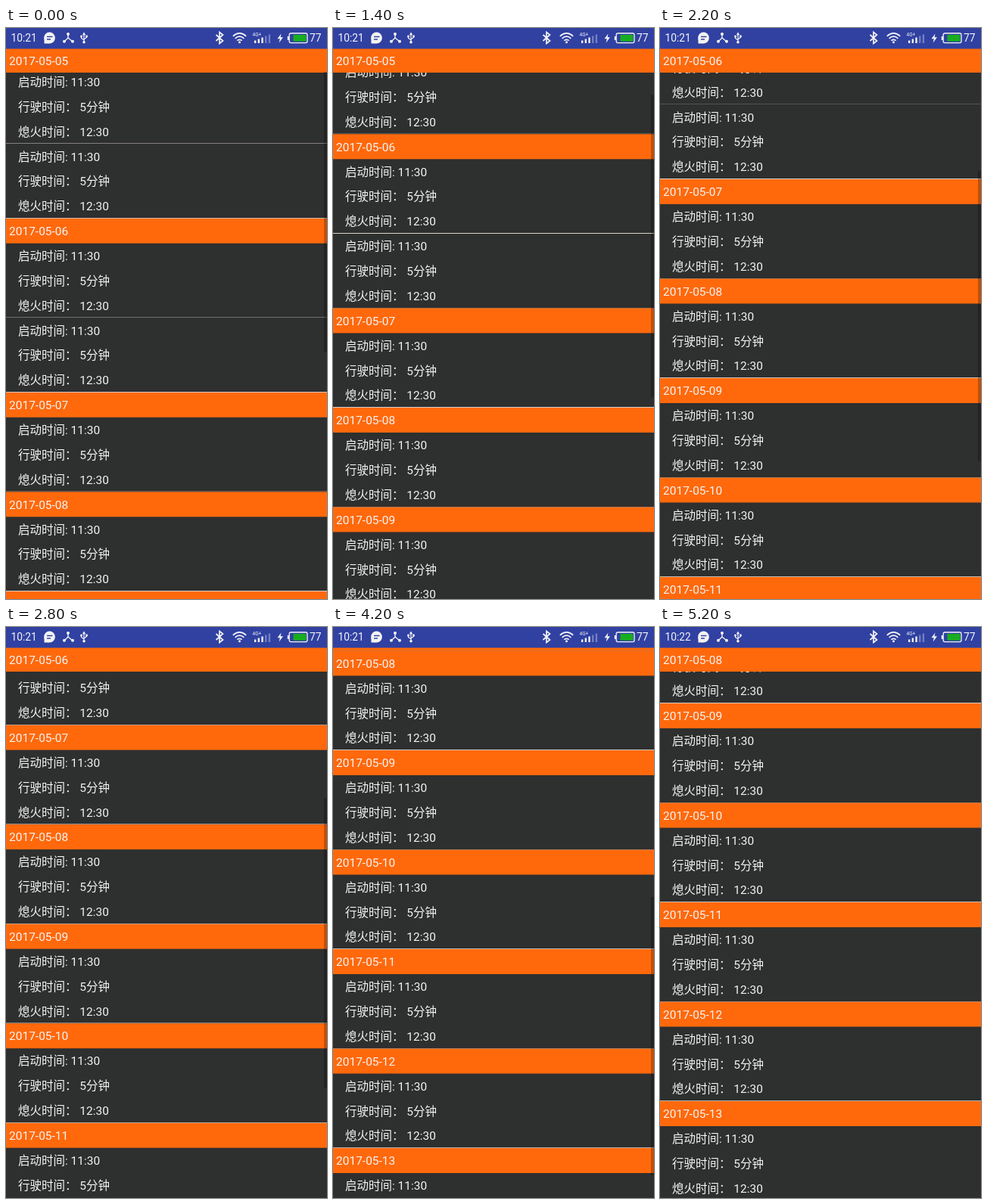
These frames come from a looping animation (424x755 px, 7000 ms). An HTML page with a canvas:

```html
<!DOCTYPE html>
<html lang="zh-CN">
<head>
<meta charset="utf-8">
<style>
html, body { margin: 0; width: 100%; height: 100%; overflow: hidden; background: #2e2f2f; }
canvas { display: block; width: 424px; height: 755px; }
</style>
</head>
<body>
<canvas id="stage" width="424" height="755"></canvas>
<script>
const ctx = document.getElementById('stage').getContext('2d');
const WIDTH = 424, HEIGHT = 755, LOOP = 7000, STEP = 200;
const BAR_BOTTOM = 27.5, PIN_TOP = 27, PIN_HEIGHT = 32;
const HEADER = 32.98, ITEM = 98.54, ROW = 32.8;
const ORANGE = '#ff690c', DARK = '#2e2f2f', BLUE = '#3041a2', WHITE = '#f4f4f4';
const FONT = 'Roboto, "Noto Sans CJK SC", "Noto Sans CJK", sans-serif';
const ROWS = ['启动时间: 11:30', '行驶时间： 5分钟', '熄火时间： 12:30'];

// [time, scroll offset]; the list moves in steps of STEP ms.
const SCROLL = [
  [0, 0], [800, 0], [1000, 15], [1200, 60], [1400, 111.4], [1600, 168], [1800, 229],
  [2000, 262], [2200, 281.9], [2400, 316], [2600, 352.2], [2800, 352.2], [3000, 408],
  [3200, 468], [3400, 515.9], [3600, 543], [4000, 543], [4200, 581.9], [4400, 620], [4600, 643.9]
];
// [scroll offset, scrollbar edge]
const THUMB_TOP = [[0, 58], [111, 88], [282, 189], [352, 226], [516, 322], [582, 357], [644, 385]];
const THUMB_END = [[0, 428], [111, 488], [282, 573], [352, 610], [516, 692], [582, 725], [644, 752]];

const groups = [];
for (let day = 5, top = 21.7; day <= 14; day++) {
  const count = day < 7 ? 2 : 1;
  groups.push({ date: '2017-05-' + String(day).padStart(2, '0'), top, count });
  top += HEADER + count * ITEM;
}

function interpolate(points, x) {
  const i = points.findIndex(p => p[0] > x);
  if (i < 0) return points[points.length - 1][1];
  if (i === 0) return points[0][1];
  const [x0, y0] = points[i - 1], [x1, y1] = points[i];
  return y0 + (y1 - y0) * (x - x0) / (x1 - x0);
}

function rect(x, y, w, h, color) {
  ctx.fillStyle = color;
  ctx.fillRect(x, y, w, h);
}

function text(str, x, baseline, size = 15.5) {
  ctx.font = `${size}px ${FONT}`;
  ctx.fillStyle = WHITE;
  ctx.fillText(str, x, baseline);
}

function dot(x, y, r, color = WHITE) {
  ctx.fillStyle = color;
  ctx.beginPath();
  ctx.arc(x, y, r, 0, Math.PI * 2);
  ctx.fill();
}

function path(d, width, color = WHITE) {
  const shape = new Path2D(d);
  if (width) {
    ctx.lineWidth = width;
    ctx.strokeStyle = color;
    ctx.stroke(shape);
  } else {
    ctx.fillStyle = color;
    ctx.fill(shape);
  }
}

// A hairline fades as it falls between two pixel rows.
function divider(top) {
  const y = top - 0.9, row = Math.round(y);
  rect(0, row, WIDTH, 1, `rgba(255,250,240,${0.85 - 1.4 * Math.abs(y - row)})`);
}

function drawGroup({ date, top, count }, scroll) {
  let y = top - scroll;
  rect(0, y, WIDTH, HEADER, ORANGE);
  divider(y);
  text(date, 4, y + 22.3);
  y += HEADER;
  for (let i = 0; i < count; i++, y += ITEM) {
    if (i) divider(y);
    ROWS.forEach((label, r) => text(label, 16, y + 22.3 + r * ROW));
  }
}

function drawPinned(scroll) {
  const next = groups.findIndex(g => g.top - scroll > PIN_TOP);
  const y = Math.min(PIN_TOP, groups[next].top - scroll - PIN_HEIGHT);
  rect(0, y, WIDTH, PIN_HEIGHT, ORANGE);
  text(groups[next - 1].date, 4, y + 22);
}

function drawStatusBar(clock) {
  rect(0, 0, WIDTH, BAR_BOTTOM, BLUE);
  text(clock, 6.5, 18, 13.8);
  text('77', 401, 18, 13.8);

  // message
  dot(57.5, 13, 7.4);
  path('M50.5 14V20.5H57Z');
  path('M54 11.5H61.5M54 15H59', 1.5, BLUE);

  // linked nodes
  path('M82 8V13L77 18M82 13L88 18', 1.4);
  [[82, 8], [77, 17.8], [88, 17.8]].forEach(([x, y]) => dot(x, y, 2));

  // USB
  path('M103 8V19M99.5 11V13.5L103 16M106.5 11V12.5L103 15', 1.2);
  path('M100.8 9.2L103 5.5L105.2 9.2Z');
  dot(103, 18.7, 1.8);
  dot(99.5, 11, 1.5);
  rect(105.2, 9.6, 2.6, 2.6, WHITE);

  // Bluetooth
  path('M277.5 9L286.5 17L282 20.5V5.5L286.5 9L277.5 17', 1.7);

  // Wi-Fi
  path('M299.8 10.8Q308.5 3 317.2 10.8M302.6 13.8Q308.5 8.6 314.4 13.8M305.3 16.7Q308.5 14 311.7 16.7', 1.7);
  dot(308.5, 18.7, 1.5);

  // mobile signal
  text('4G+', 325.5, 10.8, 6.5);
  for (let i = 0; i < 5; i++) {
    const h = 3.5 + i * 2;
    rect(328 + i * 4.7, 20 - h, 2.3, h, i < 3 ? WHITE : '#7580c2');
  }

  // battery
  path('M363.5 7.5L358.5 14.3H361.8L360.7 19.5L366 12.3H362.6Z');
  rect(371.8, 11, 2, 5, WHITE);
  ctx.strokeStyle = WHITE;
  ctx.lineWidth = 1.3;
  ctx.beginPath();
  ctx.roundRect(374.2, 7, 23.8, 12.6, 2);
  ctx.stroke();
  rect(379.5, 9, 17, 8.7, '#18ad20');
}

function draw(time) {
  const t = Math.floor((time % LOOP) / STEP) * STEP;
  const scroll = interpolate(SCROLL, t);
  rect(0, 0, WIDTH, HEIGHT, DARK);
  groups.forEach(group => drawGroup(group, scroll));
  drawPinned(scroll);
  if (t < 5000) {
    const top = interpolate(THUMB_TOP, scroll);
    rect(420, top, 4, interpolate(THUMB_END, scroll) - top, 'rgba(0,0,0,0.25)');
  }
  drawStatusBar(t < 5000 ? '10:21' : '10:22');
}

const start = performance.now();
function tick() {
  draw(performance.now() - start);
  requestAnimationFrame(tick);
}
tick();
</script>
</body>
</html>
```
